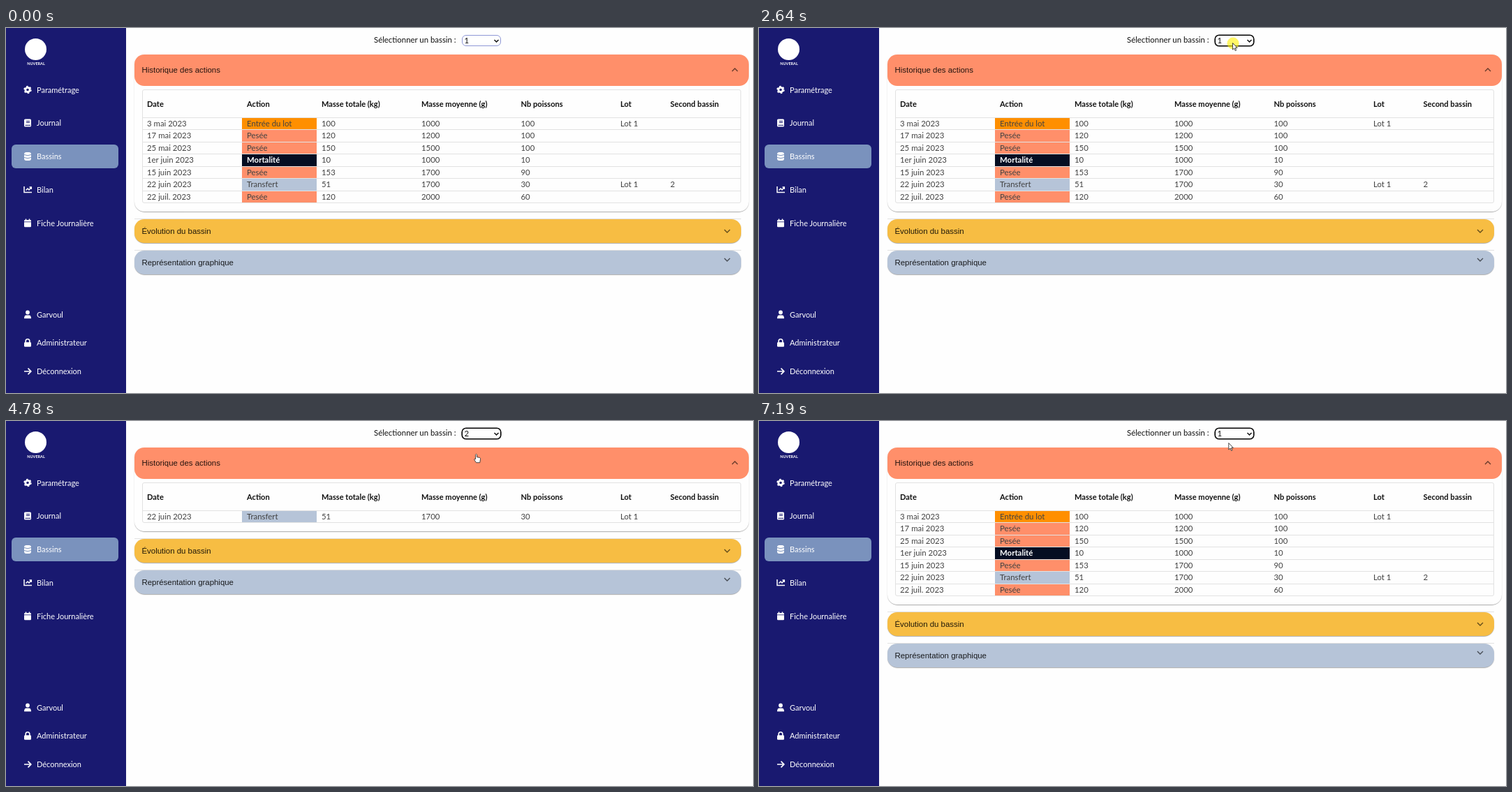
An HTML page for the animation above (8000 ms loop, 1070 by 523 pixels).

```html
<!DOCTYPE html>
<html lang="fr">
<head>
<meta charset="utf-8">
<title>Bassins</title>
<style>
html, body { margin: 0; width: 100%; height: 100%; overflow: hidden; background: #fefefe; }
body { position: relative; font: 11.4px/16px Lato, "Open Sans", sans-serif; color: #111; --dy: 0px; --bx: 0px; }
body.small { --dy: -105px; }
body.bars { --bx: .7px; }
div, svg, i { position: absolute; box-sizing: border-box; }
svg { overflow: visible; left: 0; top: 0; width: 1px; height: 1px; }
.t { white-space: nowrap; margin-top: -8px; }
#nav { left: 0; top: 0; width: 172px; height: 523px; background: #191970; color: #fff; font-size: 11px; }
.bars #nav { height: 515px; }
.bars #foot { top: -12px; }
#logo { left: 27px; top: 15px; width: 31px; height: 31px; border-radius: 50%; background: #fff; }
#name { left: 0; width: 86px; top: 51px; text-align: center; font-size: 5.5px; font-weight: 700; }
#active { left: 8px; top: 167px; width: 153px; height: 34px; border-radius: 6px; background: #7a92bd; }
.acc { left: 183.5px; width: calc(869px + var(--bx)); height: 34.5px; border-radius: 14px;
  box-shadow: 0 1.4px .7px -.7px #0003, 0 .7px .7px #00000024, 0 .7px 2.1px #0000001f; }
.acc .t, #head .t { left: 11px; font: 11.43px/16px "Liberation Sans", Arial, sans-serif; color: #000000de; }
.line { left: 183.5px; width: calc(869px + var(--bx)); height: 1px; background: #0000001c; }
#panel { top: 38px; width: calc(880.5px + var(--bx)); height: calc(225px + var(--dy)); background: #fefefe; }
#head { left: 0; top: 0; width: 100%; height: 44.5px; border-radius: 14px; background: #ff8f6a; }
#table { left: 195px; top: 88px; width: calc(858px + var(--bx)); height: calc(163px + var(--dy));
  border: 1px solid #e2e2e2; border-radius: 3px; overflow: hidden; }
#cols { left: -196px; top: -89px; font-size: 11.1px; font-weight: 700; }
.row { left: 0; width: 100%; height: 17.5px; border-top: 1px solid #e2e2e2; color: #424242; }
.row.on { background: #f4f4f4; }
.row .t { top: 8px; }
.act { left: 142px; top: 0; width: 107px; height: 16.5px; }
.bar { display: none; background: #f1f1f1; }
.bars .bar { display: block; }
.bar div { background: #bebebe; }
#select { left: 653px; top: 10px; width: 55.5px; height: 16px; border: 1px solid #8f98d6; border-radius: 6px; background: #fff; }
#select.focus { box-shadow: 0 0 0 .6px #000; border-color: #000; }
#value { left: 2.5px; top: 7px; }
#popup { left: 653px; top: 26px; width: 56px; height: 32px; background: #fff; border: 1px solid #777; box-shadow: 1px 1px 3px #0006; }
.opt { left: 0; width: 54px; height: 15px; padding-left: 3px; line-height: 15px; }
.opt.on { background: #1e90ff; color: #fff; }
#click { left: -8.5px; top: -8.5px; width: 17px; height: 17px; border-radius: 50%; background: #fff000; opacity: .6; }
#mouse { left: 0; top: 0; }
#mouse path { fill: #fff; stroke: #333; stroke-width: .9; stroke-linejoin: round; }
</style>
</head>
<body>
<div id="nav">
  <div id="logo"></div><div id="name" class="t">NUVERAL</div>
  <div id="active"></div><div id="menu"></div><div id="foot"></div>
</div>
<div class="t" style="left:527px;top:17px">Sélectionner un bassin :</div>
<div id="panel" class="acc">
  <div id="head"><div class="t" style="top:22px">Historique des actions</div></div>
</div>
<div id="table"><div id="cols"></div><div id="rows" style="left:0;top:38.5px;width:100%"></div></div>
<div class="line" style="top:calc(273px + var(--dy))"></div>
<div class="line" style="top:calc(318px + var(--dy))"></div>
<div class="acc" style="top:calc(273.7px + var(--dy));background:#f7bd43"><div class="t" style="top:17.3px">Évolution du bassin</div></div>
<div class="acc" style="top:calc(318.7px + var(--dy));background:#b6c4d8"><div class="t" style="top:17.3px">Représentation graphique</div></div>
<svg id="chevrons" fill="none" stroke="#0009" stroke-width="1.4">
  <path d="M1040 62l4-4 4 4"/>
  <path class="down" d="M1029 289l4 4 4-4m-8 41l4 4 4-4"/>
</svg>
<div class="bar" style="left:196px;top:134px;width:857px;height:12.5px">
  <div style="left:11px;top:1.5px;width:811px;height:9.5px"></div>
  <div style="left:845px;top:0;width:12px;height:12.5px;background:#d8d8d8"></div>
  <svg fill="#555"><path d="M4 6l3-2.5v5zM837.500 3.500l3 2.500-3 2.500zM848.500-1.500h5l-2.500-3z"/></svg>
</div>
<div class="bar" style="left:0;top:515.5px;width:1070px;height:7.5px">
  <div style="left:8px;top:1px;width:1055px;height:6px"></div>
  <svg fill="#555"><path d="M2 4l2.500-2v4zM1066 2l2.500 2-2.500 2z"/></svg>
</div>
<div id="select">
  <div id="value" class="t">1</div>
  <svg fill="none" stroke="#111" stroke-width="1.5"><path d="M45.500 6l3 3 3-3"/></svg>
</div>
<div id="popup"><div class="opt" style="top:0">1</div><div class="opt" style="top:15px">2</div></div>
<div id="mouse">
  <div id="click"></div>
  <svg id="arrow"><path d="M0 0V9.500L2.200 7.500 3.700 11 5.200 10.400 3.700 7H6.600Z"/></svg>
  <svg id="hand"><path d="M-1 1Q0-.8 1 1V4.500L5 5.300Q6.300 5.700 6 7.500L5.200 12.500H0L-2.800 8.300Q-3.200 6.600-1 7.500Z"/></svg>
</div>
<script>
const $ = id => document.getElementById(id);
const text = (x, y, s) => `<div class="t" style="left:${x}px;top:${y}px">${s}</div>`;

// Icons are centred on the origin; navy strokes cut details out of white shapes.
const navy = 'stroke="#191970" fill="none"', white = 'stroke="#fff" fill="none"';
const icons = {
  gear: `<circle r="3.2" ${white} stroke-width="2.800"/><circle r="4.700" ${white} stroke-width="2" stroke-dasharray="2.460"/>`,
  book: `<rect x="-5" y="-5.500" width="10" height="11" rx="1.500"/><path d="M-2-2.500h5M-2-.5h5M-3.500 3.300h7.500" ${navy}/>`,
  stack: `<rect x="-5" y="-6" width="10" height="12" rx="3"/><path d="M-5-2.500q5 2.500 10 0M-5 1.500q5 2.500 10 0" stroke="#7a92bd" fill="none"/>`,
  chart: `<path d="M-5-4.500V4H6M-2.500 1L0-1.500 2 .5 5-3M2.500-3.500H5.300V-.5" ${white} stroke-width="1.500"/>`,
  calendar: `<rect x="-5" y="-4.500" width="10" height="10.300" rx="1.300"/><path d="M-2.500-6v3M2.500-6v3" ${white} stroke-width="1.500"/><path d="M-5-1.700H5" ${navy} stroke-width=".8"/>`,
  user: `<circle cy="-3" r="2.900"/><path d="M-5 5.700Q-5 .9-2 .9H2Q5 .9 5 5.700Z"/>`,
  lock: `<rect x="-5" y="-.8" width="10" height="6.600" rx="1.300"/><path d="M-2.800 0V-2.500a2.800 2.800 0 0 1 5.600 0V0" ${white} stroke-width="1.600"/>`,
  arrow: `<path d="M-5 0H4.500M.5-4.300L4.800 0 .5 4.300" ${white} stroke-width="1.700"/>`
};
const item = ([icon, y, label]) =>
  `<svg fill="#fff"><g transform="translate(31 ${y})">${icons[icon]}</g></svg>` + text(44, y, label);
$('menu').innerHTML = [['gear', 88.5, 'Paramétrage'], ['book', 136, 'Journal'], ['stack', 184, 'Bassins'],
  ['chart', 231.5, 'Bilan'], ['calendar', 279.5, 'Fiche Journalière']].map(item).join('');
$('foot').innerHTML = [['user', 410.5, 'Garvoul'], ['lock', 451, 'Administrateur'],
  ['arrow', 492, 'Déconnexion']].map(item).join('');

const colX = [202, 345, 452, 595, 737.5, 880, 951.5];
$('cols').innerHTML = ['Date', 'Action', 'Masse totale (kg)', 'Masse moyenne (g)', 'Nb poissons', 'Lot', 'Second bassin']
  .map((s, i) => text(colX[i], 108.5, s)).join('');

const colors = { 'Entrée du lot': '#ff8f00', 'Pesée': '#ff8f6a', 'Mortalité': '#040d22', 'Transfert': '#b6c4d8' };
const basins = {
  1: `3 mai 2023|Entrée du lot|100|1000|100|Lot 1
17 mai 2023|Pesée|120|1200|100
25 mai 2023|Pesée|150|1500|100
1er juin 2023|Mortalité|10|1000|10
15 juin 2023|Pesée|153|1700|90
22 juin 2023|Transfert|51|1700|30|Lot 1|2
22 juil. 2023|Pesée|120|2000|60`,
  2: '22 juin 2023|Transfert|51|1700|30|Lot 1'
};
function rowHtml(line, i) {
  const cells = line.split('|'), dead = cells[1] === 'Mortalité';
  const label = dead ? `<b style="color:#fff">${cells[1]}</b>` : cells[1];
  return `<div class="row" style="top:${i * 17.5}px"><div class="act" style="background:${colors[cells[1]]}"></div>` +
    cells.map((s, k) => text(colX[k] - 196, 8, k === 1 ? label : s)).join('') + '</div>';
}

// Pointer path: time, x, y
const path = [[320, 690, 526], [1060, 665.5, 156.5], [1110, 665.5, 156.5], [1910, 677, 22.5], [2040, 678.5, 21.5],
  [3000, 678.5, 21.5], [3240, 673.5, 47.5], [4740, 673.5, 47.5], [5390, 678.5, 21], [5870, 678.5, 21], [6250, 672.8, 31.5]];
function pointer(t) {
  const i = path.findIndex(p => p[0] > t);
  if (i < 1) return path[i ? path.length - 1 : 0].slice(1);
  const [a, b] = [path[i - 1], path[i]], u = (t - a[0]) / (b[0] - a[0]), e = u * u * (3 - 2 * u);
  return [a[1] + (b[1] - a[1]) * e, a[2] + (b[2] - a[2]) * e];
}

const within = (t, ...spans) => spans.some(([a, b]) => t >= a && t < b);
const show = (id, on) => { $(id).style.display = on ? '' : 'none'; };
let shown;

function draw(t) {
  const basin = within(t, [3770, 7190]) ? 2 : 1, value = within(t, [3700, 7120]) ? 2 : 1;
  const open = within(t, [2710, 3640], [5580, 7060]), bars = within(t, [3770, 3850]);
  const [x, y] = pointer(t), dy = basin === 2 ? -105 : 0, bx = bars ? .7 : 0;

  if (shown !== basin) $('rows').innerHTML = basins[shown = basin].split('\n').map(rowHtml).join('');
  document.body.className = (basin === 2 ? 'small ' : '') + (bars ? 'bars' : '');
  $('chevrons').style.transform = `translateX(${bx}px)`;
  document.querySelector('.down').setAttribute('transform', `translate(0 ${dy})`);

  // The highlighted row trails the pointer a little.
  const hover = t < 430 ? -1 : Math.floor((pointer(t - 110)[1] - 127.5) / 17.5);
  document.querySelectorAll('.row').forEach((r, i) => r.classList.toggle('on', i === hover));

  $('select').className = within(t, [2640, 2710], [3700, 5580], [7120, 8000]) ? 'focus' : '';
  $('value').textContent = value;
  show('popup', open);
  const choice = y < 27 ? value : y < 42 ? 1 : 2;
  document.querySelectorAll('.opt').forEach((o, i) => o.classList.toggle('on', i + 1 === choice));

  const onHeader = !open && within(y, [38, 82], [274 + dy, 308 + dy], [319 + dy, 353 + dy]);
  show('mouse', t >= 320);
  show('hand', onHeader);
  show('arrow', !onHeader);
  show('click', within(t, [2640, 2840], [3500, 3640], [5580, 5660], [6990, 7060]));
  $('mouse').style.transform = `translate(${x}px, ${y}px)`;
}

function tick() {
  draw(performance.now() % 8000);
  requestAnimationFrame(tick);
}
tick();
</script>
</body>
</html>
```
